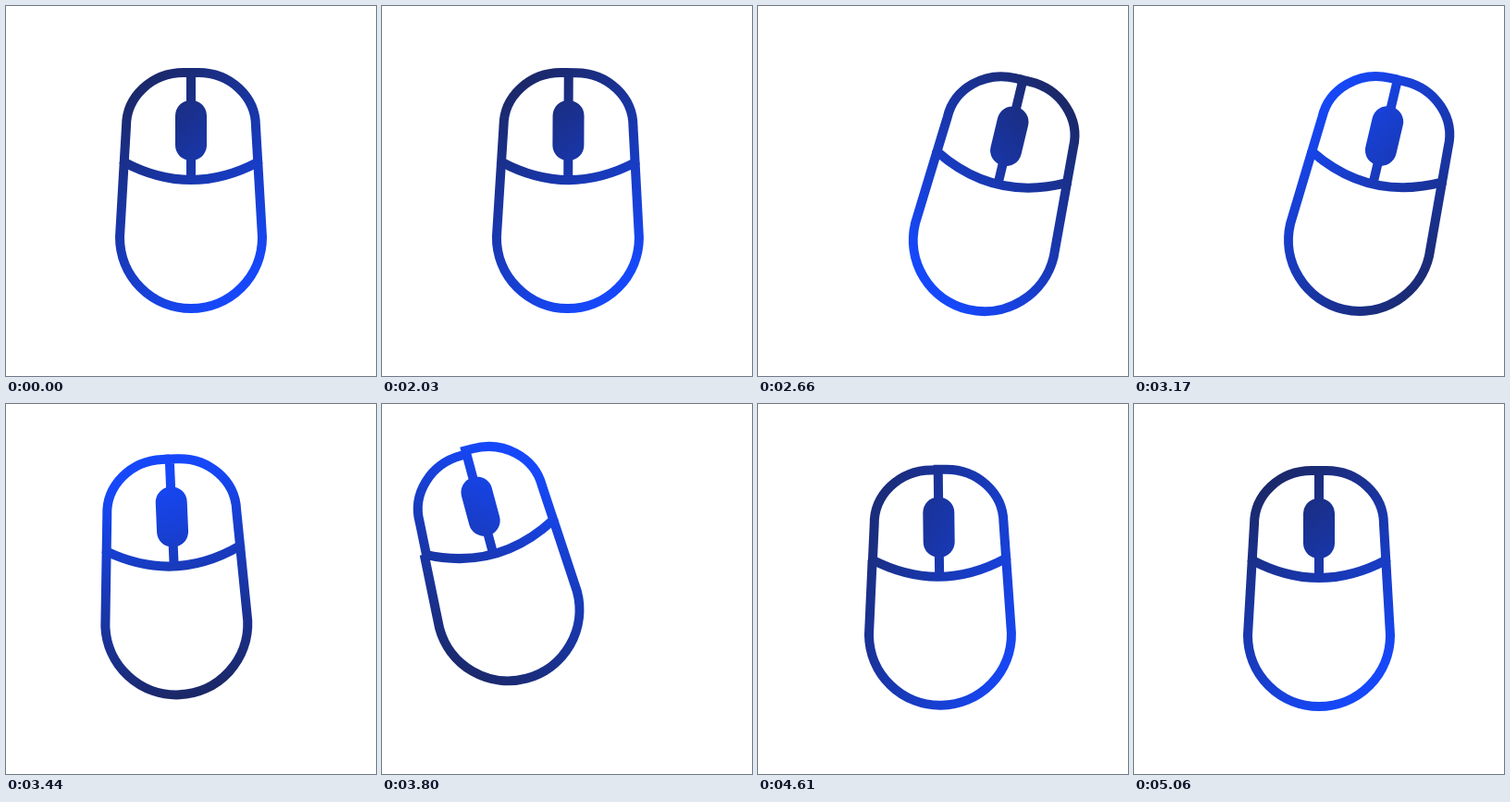
Recreate the animation shown at these times as an HTML page. Size 400x400 px, loop 5.12 s.

```html
<!DOCTYPE html>
<html lang="en">
<head>
<meta charset="utf-8">
<title>Mouse</title>
<style>
  html, body { margin: 0; height: 100%; overflow: hidden; background: #fff; }
  svg { display: block; width: 100%; height: 100%; }
</style>
</head>
<body>
<svg viewBox="0 0 400 400">
  <defs>
    <linearGradient id="blue" gradientUnits="userSpaceOnUse" x1="-125" y1="0" x2="110" y2="0">
      <stop offset="0" stop-color="#1b2868"/>
      <stop offset="1" stop-color="#1648fa"/>
    </linearGradient>
  </defs>
  <g id="mouse" fill="none" stroke="url(#blue)" stroke-width="10">
    <path d="M-72.3 -31 L-77 50 A77 77 0 0 0 77 50 L72.3 -31"/>
    <path d="M-72 -31 Q0 7 72 -31"/>
    <path id="left" d="M-72.4 -29 L-70 -70 A62 58 0 0 1 -8 -128 H0"/>
    <path d="M0 -12 V-128 H8 A62 58 0 0 1 70 -70 L72.4 -29"/>
    <rect x="-17" y="-98" width="34" height="65" rx="16.5" fill="url(#blue)" stroke="none"/>
  </g>
</svg>
<script>
const LOOP = 5120;
const blue = document.getElementById('blue');
const mouse = document.getElementById('mouse');
const left = document.getElementById('left');

// poses: x offset, y offset, tilt
const HOME = [0, 0, 0], RIGHT = [56.5, 4.5, 13.5], LEFT = [-76.5, -26, -15];
const moves = [
  [2000, 2340, HOME, RIGHT],
  [3140, 3700, RIGHT, LEFT],
  [4190, 4680, LEFT, HOME]
];
// time and direction of the gradient
const turns = [[0, 50], [2000, 50], [2240, 68], [3080, 212], [3800, 298],
               [4160, 338], [4400, 368], [5060, 410], [LOOP, 410]];

const part = (t, a, b) => Math.min(1, Math.max(0, (t - a) / (b - a)));
const ease = p => (1 - Math.cos(Math.PI * p)) / 2;
const mix = (a, b, p) => a + (b - a) * p;

function poseAt(t) {
  const [a, b, from, to] = moves.filter(m => t >= m[0]).pop() || moves[0];
  const p = ease(part(t, a, b));
  return from.map((v, i) => mix(v, to[i], p));
}

function turnAt(t) {
  const i = turns.findIndex(k => k[0] > t);
  const [a, from] = turns[i - 1], [b, to] = turns[i];
  return mix(from, to, part(t, a, b));
}

function draw(t) {
  const [x, y, tilt] = poseAt(t);
  mouse.setAttribute('transform', `translate(${200 + x} ${200 + y}) rotate(${tilt})`);
  blue.setAttribute('gradientTransform', `rotate(${turnAt(t) - tilt})`);
  // the left button trails a little on the way to the left
  const lag = Math.sin(Math.PI * part(t, 3450, 4120)) + 0.3 * Math.sin(Math.PI * part(t, 4200, 4680));
  left.setAttribute('transform', `translate(${2 * lag} ${4 * lag})`);
}

const start = performance.now();
function tick() {
  draw((performance.now() - start) % LOOP);
  requestAnimationFrame(tick);
}
draw(0);
requestAnimationFrame(tick);
</script>
</body>
</html>
```
